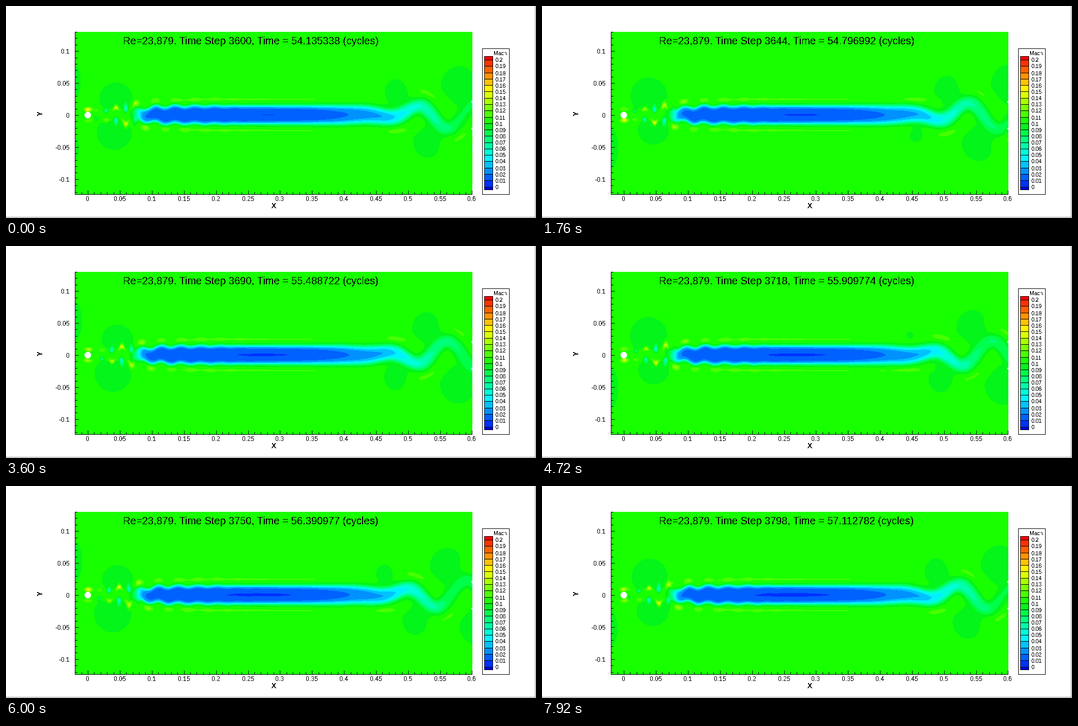
A matplotlib script for the animation above (8000 ms loop, 1024x410 px).

```python
import numpy as np
import matplotlib as mpl
import matplotlib.pyplot as plt
from matplotlib.animation import FuncAnimation
from matplotlib.patches import Circle, Rectangle

mpl.rcParams.update({"font.family": "Liberation Sans", "text.antialiased": False,
                     "toolbar": "None"})

W, H, DPI = 1024, 410, 64
FRAMES, STEP_MS = 100, 80
LEFT, RIGHT, TOP, BOTTOM = 134, 901, 50, 364
X0, Y0, SCALE = 158, 210.5, 1238
ROW0, ROW1 = 96, 324          # rows the flow can disturb
FREE = 0.105                  # undisturbed Mach number
SHED, SHED_LEN = 2.78, 38.3   # vortex street: period (s), wavelength (px)
SPEED, WAVE_LEN = 16.3, 121   # downstream meander: px/s, wavelength (px)


def rainbow(i):
    f = i / 21 * 4
    return (np.clip(f - 2, 0, 1), np.clip(min(f, 4 - f), 0, 1), np.clip(2 - f, 0, 1))


COLORS = np.array([rainbow(i) for i in range(22)])
COLORS[10] = (0.012, 0.962, 0.1)

x = (np.arange(LEFT, RIGHT) + 0.5)[None, :].astype(np.float32)
s = (np.arange(ROW0, ROW1) + 0.5 - Y0)[:, None].astype(np.float32)


def along(*pts):
    """Piecewise linear profile over x, given as (x, value) pairs."""
    px, pv = zip(*pts)
    return np.interp(x, px, pv).astype(np.float32)


def sigmoid(v):
    return 1 / (1 + np.exp(-v))


# vortex street
ridge_y = along((165, 5), (193, 7), (213, 13), (233, 18), (252, 23), (290, 27), (400, 30))
ridge_w = along((165, 4), (193, 4.5), (233, 6.5), (270, 5.5), (400, 5))
ridge_a = along((160, .06), (193, .095), (213, .064), (233, .043), (252, .032),
                (288, .016), (325, .008), (400, .003), (480, 0))
low_a = along((165, .5), (193, .85), (213, .62), (233, .5), (252, .62), (268, .5),
              (285, .1), (300, 0))
low_y = along((165, 3), (193, 4), (213, 5), (233, 8), (250, 3), (265, 0))
low_w = along((165, 4), (193, 6), (213, 11), (233, 13), (252, 9), (275, 8))
street = sigmoid((x - 167) / 2)
apart = sigmoid((x - 250) / 4)
strip_a = along((300, 0), (340, .0052), (400, .0056), (660, .0056), (700, .002), (720, 0))

# long wake
half = along((240, 9), (265, 12), (290, 16), (320, 17.5), (400, 18), (650, 18),
             (700, 16.5), (735, 14), (790, 12), (901, 12))
shear = along((265, 3.6), (400, 3.8), (500, 4.2), (600, 5.2), (680, 6), (760, 6.5), (901, 7))
scallop = along((255, 2.5), (290, 3), (330, 2), (370, 1.1), (450, .3), (500, 0))
core = along((235, .094), (245, .08), (255, .045), (262, .02), (270, .009), (285, .004),
             (320, .001), (400, 0), (590, 0), (620, .003), (663, .009), (732, .019),
             (770, .036), (800, .046), (835, .057), (865, .066), (901, .072))
sway = 28 * sigmoid((x - 785) / 28)

cyl_side = np.exp(-((x - 159) / 7) ** 2 - ((abs(s) - 9) / 5) ** 2)
cyl_low = (.7 * np.exp(-((x - 150.5) / 3) ** 2 - (s / 4) ** 2)
           + .45 * np.exp(-((x - 167) / 3) ** 2 - (s / 4) ** 2))


def ellipse(cx, cy, rx, ry, tilt=0.0):
    return ((x - cx) / rx) ** 2 + ((s - cy - tilt * (x - cx)) / ry) ** 2


def lobes(t, swing):
    """Slow regions outside the wake and fast patches across from them."""
    slow, fast = np.full((2, s.size, x.size), 30, np.float32)
    for side in (-1, 1):
        k = -side * swing
        r = (65 + 8 * k) / 2
        slow = np.minimum(slow, ellipse(211 - 5 * k, side * r, 33 + 3 * k, r))
        weak = .0085 * (.55 + .45 * (.5 - .5 * k))
        edge = ellipse(130, side * 65, 19, 45) - np.log(weak / .0095) / .64
        slow = np.minimum(slow, edge)
    for m in range(-3, 4):
        cx = 755 + SPEED * t + 60.5 * m
        if not 704 < cx < 960:
            continue
        side = -1 if m % 2 == 0 else 1
        r = np.interp(cx, (700, 718, 735, 755, 815, 850, 900), (2, 10, 18, 23, 29, 34, 38))
        dist = np.interp(cx, (700, 755, 815, 900), (36, 44, 51, 56))
        slow = np.minimum(slow, ellipse(cx, side * dist, r, r * 1.1))
        gap = np.interp(cx, (700, 755, 815, 880), (28, 30, 38, 41))
        ry = np.interp(cx, (700, 755, 815, 880), (4, 6, 9, 11))
        tilt = np.interp(cx, (720, 760, 820), (0, .1, .45)) * side
        fast = np.minimum(fast, ellipse(cx + 4, -side * gap, 23, ry, tilt))
    return .0095 * np.exp(-.64 * slow), .0085 * np.exp(-.53 * fast)


def mach(t):
    tau = t / SHED
    c = np.cos(2 * np.pi * ((x - 193) / SHED_LEN - tau))
    slow, fast = lobes(t, np.cos(2 * np.pi * (tau - .7)))

    snake = np.exp(-((s - ridge_y * c) / ridge_w) ** 2) * (.3 + .7 * c * c)
    side = np.sign(s)
    band = np.exp(-((abs(s) - ridge_y) / ridge_w) ** 2)
    puffs = band * ((1 + side * c) / 2) ** 2
    outer = FREE - slow + fast + strip_a * band
    outer += ridge_a * street * (snake * (1 - apart) + puffs * apart)
    outer += .045 * cyl_side * (1 - .35 * side * np.cos(2 * np.pi * tau))
    low = low_a * street * c ** 4 * np.exp(-((s + low_y * c) / low_w) ** 2)
    outer *= (1 - low) * (1 - cyl_low)

    k = 2 * np.pi / WAVE_LEN
    th = k * (x - 793 - SPEED * t)
    bend = np.sin(th)
    n = (s + sway * np.cos(th)) / np.sqrt(1 + (sway * k * bend) ** 2) - scallop * c
    wake = .5 * (1 - np.tanh((abs(n) - half) / shear))
    wake *= 1 - .35 * sigmoid((x - 835) / 12) * np.maximum(0, -bend)
    d = np.clip(x - (508 - 3 * t), -100, 100)
    center = .01 + core + 1e-7 * (d * d - 350 - 650 * t)
    return outer - (outer - center - 4e-5 * n * n) * wake


fig = plt.figure(figsize=(W / DPI, H / DPI), dpi=DPI, facecolor="white")
ax = fig.add_axes([0, 0, 1, 1])
ax.axis("off")


def box(x0, y0, x1, y1, color, z=2):
    ax.add_patch(Rectangle((x0, y0), x1 - x0, y1 - y0, fc=color, ec="none",
                           antialiased=False, zorder=z))


def label(px, py, text, size, ha="center", va="baseline", **kw):
    return ax.text(px, py, text, fontsize=size * 72 / DPI, ha=ha, va=va, zorder=6, **kw)


def number(v):
    return f"{v:.2f}".rstrip("0").rstrip(".") if abs(v) > 1e-9 else "0"


box(LEFT, TOP, RIGHT, BOTTOM, COLORS[11], 1)
image = ax.imshow(np.zeros((ROW1 - ROW0, RIGHT - LEFT, 3)), interpolation="nearest",
                  extent=(LEFT, RIGHT, ROW1, ROW0), aspect="auto", zorder=2)
ax.set_xlim(0, W)
ax.set_ylim(H, 0)
ax.add_patch(Circle((X0, Y0 + .5), 6.3, fc="white", ec="none", zorder=4))
for y in (185.5, 237):
    ax.add_patch(Circle((901, y), 1.8, fc="white", ec="none", zorder=4))

# axes with inward ticks
box(133, TOP, 134, BOTTOM + 1, "black", 4)
box(133, BOTTOM, RIGHT, BOTTOM + 1, "black", 4)
for i in range(-1, 61):
    px, size = round(X0 + i * .01 * SCALE), 7 if i % 5 == 0 else 4
    px = min(px, RIGHT - 1)
    box(px, BOTTOM - size, px + 1, BOTTOM, "black", 4)
    if i % 5 == 0:
        label(px, 377, number(i / 100), 12.2)
for i in range(-12, 14):
    py, size = round(211 - i * .01 * SCALE), 7 if i % 5 == 0 else 4
    box(LEFT, py, LEFT + size, py + 1, "black", 4)
    if i % 5 == 0:
        label(123.5, py + 4.5, number(i / 100), 12.2, ha="right")
label(517, 391, "X", 13.5, weight="bold")
label(67, 207, "Y", 13.5, va="center", weight="bold", rotation=90)

# legend
box(920, 82, 973, 365, "black")
box(921, 83, 972, 364, "white")
label(942, 95, "Mach", 10.4, ha="left")
box(924, 97, 941, 356, "black")
edges = [355] + [round(349.6 - 12.28 * i) for i in range(21)] + [97]
for i in range(22):
    box(925, edges[i + 1] + 1, 940, edges[i], COLORS[i], 3)
    if i < 21:
        label(946, edges[i + 1] + 4.5, number(i / 100), 10.4, ha="left")

# window edge
box(0, 408, W, 409, "#808080")
box(1022, 0, 1023, 409, "#808080")

title = label(226.5, 74, "", 19.84, ha="left")


def update(i):
    step = 3600 + 2 * i
    bands = np.clip(np.floor(mach(i * STEP_MS / 1000) * 100).astype(int) + 1, 0, 21)
    image.set_data(COLORS[bands])
    title.set_text(f"Re=23,879. Time Step {step}, Time = {step / 66.5:.6f} (cycles)")
    return image, title


anim = FuncAnimation(fig, update, frames=FRAMES, interval=STEP_MS, repeat=True,
                     repeat_delay=0, blit=False)
plt.show()
```
